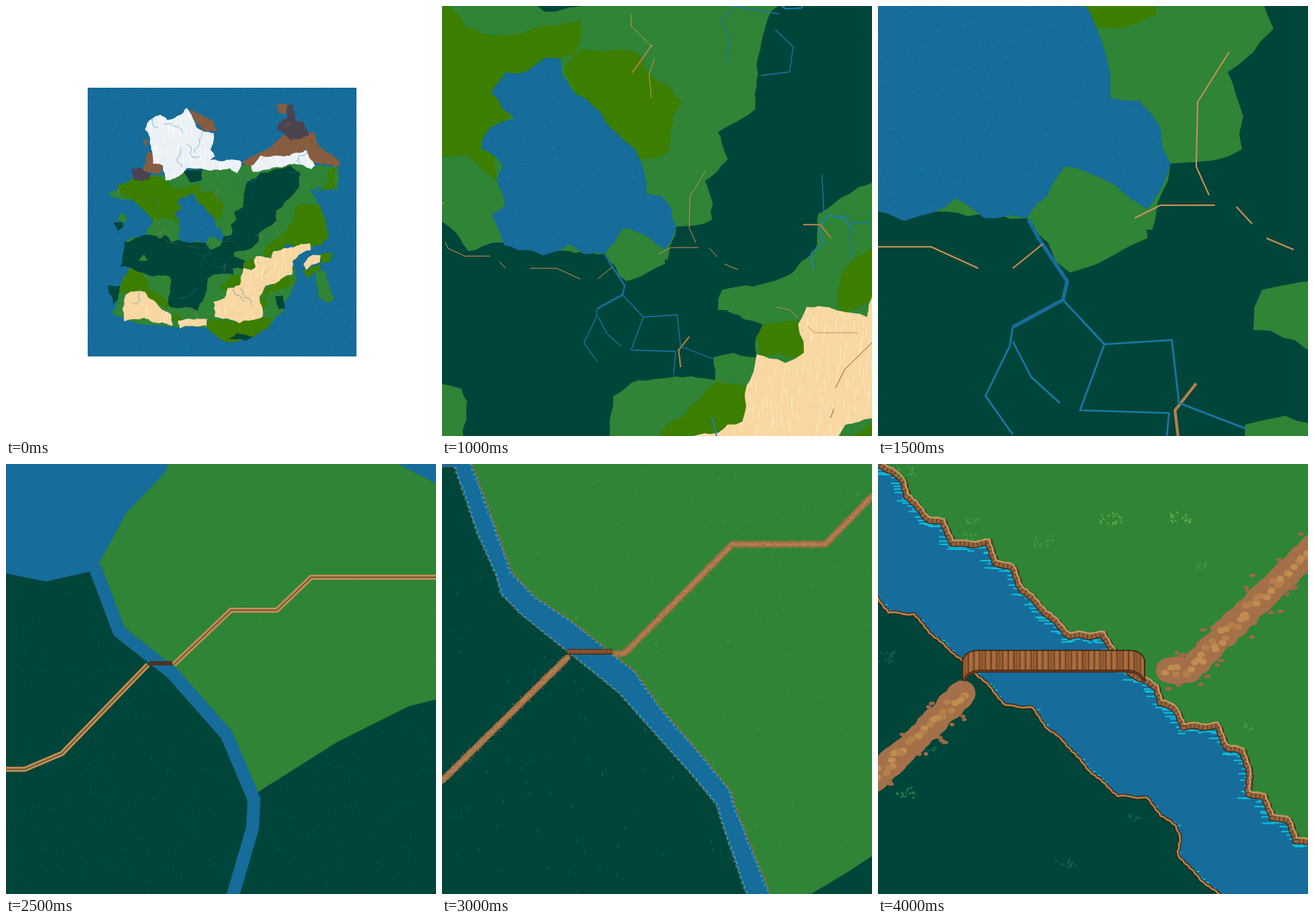
Recreate the animation shown at these times as an HTML page with a canvas. Size 600 by 600 pixels, loop 4500 ms.

```html
<!DOCTYPE html>
<html lang="en">
<head>
<meta charset="utf-8">
<title>Map zoom</title>
<style>
html, body { margin: 0; width: 100%; height: 100%; overflow: hidden; background: #fff; }
canvas { display: block; width: 600px; height: 600px; }
</style>
</head>
<body>
<canvas id="stage" width="600" height="600"></canvas>
<script>
const WATER = '#166c9a', GREEN = '#2f8436', GRASS = '#3b7e00', DARK = '#004539',
  ICE = '#ecf1f6', BROWN = '#875d3f', STONE = '#4b4350', SAND = '#f8d7a3',
  ROAD = '#c98f55', CYAN = '#0cc0dc';
const STEP = 500;
let g, px, seed, left, top0;

const rand = () => (seed = (seed * 16807) % 2147483647) / 2147483647;
const hash = (x, y) => { const v = Math.sin(x * 12.99 + y * 78.23) * 4375.85; return v - Math.floor(v) - .5; };
const pairs = s => s.trim().split(/\s+/).map(Number)
  .reduce((a, v, i, n) => i % 2 ? [...a, [n[i - 1], v]] : a, []);
const path = (s, end = 'z') => new Path2D('M' + s + end);
const join = a => a.flat().join(' ');

// Outline broken up by fixed midpoint shifts, like the edges of map cells
function rough(s) {
  const p = pairs(s), out = [];
  const split = (a, b) => {
    const len = Math.hypot(b[0] - a[0], b[1] - a[1]);
    if (len < 8) return out.push(a);
    const x = (a[0] + b[0]) / 2, y = (a[1] + b[1]) / 2;
    const d = Math.min(len, 50) * .22, m = [x + hash(x, y) * d, y + hash(y, x) * d];
    split(a, m);
    split(m, b);
  };
  p.forEach((a, i) => split(a, p[(i + 1) % p.length]));
  return path(join(out));
}
function fill(color, ...shapes) {
  g.fillStyle = color;
  shapes.forEach(s => g.fill(s));
}
function land(color, ...list) {
  const shapes = list.map(rough);
  fill(color, ...shapes);
  return shapes;
}
function line(color, width, ...list) {
  g.strokeStyle = color;
  g.lineWidth = width;
  list.forEach(s => g.stroke(path(s, '')));
}
// Random marks over the visible part, kept inside the shapes
function specks(color, n, w, h, shapes) {
  const all = new Path2D();
  shapes.forEach(s => all.addPath(s));
  g.save();
  g.clip(all);
  g.fillStyle = color;
  for (let i = 0; i < n; i++)
    g.fillRect(left + Math.floor(rand() * 600) * px, top0 + Math.floor(rand() * 600) * px,
      w * px, Math.ceil(h * (.5 + rand() / 2)) * px);
  g.restore();
}
// Points at even distances along a line, swung sideways in turn
function sample(s, step, amp = 0) {
  const p = pairs(s), out = [];
  for (let i = 1; i < p.length; i++) {
    const [ax, ay] = p[i - 1], [bx, by] = p[i];
    const n = Math.max(1, Math.round(Math.hypot(bx - ax, by - ay) / step));
    for (let j = 0; j < n; j++)
      out.push([ax + (bx - ax) * j / n + (out.length % 2 ? amp : -amp), ay + (by - ay) * j / n]);
  }
  return [...out, p[p.length - 1]];
}
function disc(color, x, y, rx, ry = rx) {
  g.fillStyle = color;
  g.beginPath();
  g.ellipse(x, y, rx, ry, 0, 0, 7);
  g.fill();
}
function dirt(s, w) {
  const p = sample(s, w / 7);
  for (const [x, y] of p) {
    const a = rand() * 7, r = w * (.5 + rand() * .28);
    disc('#9a6a48', x + Math.cos(a) * r, y + Math.sin(a) * r, w * (.07 + rand() * .05), w * .06);
  }
  for (const [x, y] of p) disc('#a47049', x, y, w * (.38 + rand() * .1));
  for (const [x, y] of p)
    disc(rand() < .5 ? '#c08c50' : '#b57f4b', x + (rand() - .5) * w * .3, y + (rand() - .5) * w * .3, w * .13, w * .1);
}
// Thin wandering line from a point
function wander(color, x, y, n, len) {
  let s = x + ' ' + y, a = hash(x, y) * 7;
  for (let i = 0; i < n; i++) {
    a += hash(x, a) * 2.4;
    s += ` ${x += Math.cos(a) * len} ${y += Math.sin(a) * len}`;
  }
  line(color, 1, s);
}

function overview() {
  const map = path('-72 -72h750v750h-750');
  fill(WATER, map);
  land(GREEN,
    `-16 222 44 195 100 172 250 155 385 142 505 139 626 150 626 212 597 208 548 212 582 272 592 300 598 350 500 415
     510 465 480 520 478 545 430 600 386 626 310 636 260 600 50 582 -4 560 18 480 45 430 20 428 30 360 90 342 110 298
     50 240 0 234`,
    '10 290 25 278 38 295 22 308', '565 440 592 440 616 515 605 528 570 510');
  land(GRASS,
    '10 203 50 182 130 178 160 203 240 198 236 222 200 250 180 300 182 311 160 292 110 298 50 240 20 222',
    '228 232 240 218 278 220 311 254 302 290 281 295 240 260',
    '510 257 578 258 592 300 598 350 580 368 505 372 422 402 422 375 485 325',
    '562 225 600 195 600 158 626 150 620 212');
  land(GRASS,
    '365 411 394 409 396 434 365 432', '40 437 75 437 100 490 128 505 155 525 150 545 18 495',
    '295 488 322 463 335 450 358 453 357 490', '408 530 425 490 480 453 512 465 430 505 414 566',
    '260 600 270 572 350 582 440 570 430 600 386 626 310 636', '163 575 172 555 190 585',
    '575 394 614 390 605 412 580 418', '525 440 578 420 578 435 540 460');
  land(DARK,
    `410 165 495 145 522 168 518 205 455 270 455 300 428 319 406 333 403 360 367 382 339 386 300 390 307 342 332 337
     327 310 343 295 336 276 362 260 367 210 378 188`,
    `20 428 30 360 70 345 115 340 130 350 143 338 162 359 186 353 210 358 258 361 300 365 339 386 336 400 367 410
     363 433 333 433 334 449 281 449 263 460 258 500 235 550 155 537 157 455 95 450 45 430`);
  land(DARK, '190 160 246 155 246 185 215 192', '450 510 472 507 478 545 460 545',
    '-16 480 18 480 12 520 0 532', '0 305 25 303 27 315 12 328', '318 630 345 612 388 622 370 634');
  land(GREEN, '70 412 85 393 95 410', '238 545 250 527 264 545 252 560');
  land(WATER,
    `216 224 226 225 227 236 261 273 281 294 286 319 296 320 307 342 299 358 270 343 257 361 242 361 232 354 214 362
     187 355 178 334 187 328 182 308 186 300 171 288 177 273 194 267 178 249 188 234 197 235`,
    '470 378 490 362 505 374 490 388');
  land(GREEN, '270 343 299 358 299 368 272 380 257 361');
  const brown = land(BROWN, '204 -16 240 0 280 20 290 48 250 50', '80 75 98 72 92 97',
    '95 107 112 108 138 143 130 170 78 160',
    '358 135 440 92 475 60 560 52 585 100 632 138 624 150 500 130 390 150', '456 -24 490 -24 480 2 462 0');
  specks('#73492f', 900, 1, 1, brown);
  land(STONE, '50 155 75 150 105 170 95 185 60 187',
    '462 25 485 15 482 -20 500 -26 508 20 530 22 545 60 492 75 457 45');
  const ice = land(ICE,
    `95 25 130 3 150 18 204 -16 220 10 250 50 280 55 270 100 283 120 270 130 330 128 357 135 345 167 325 153 262 158
     205 152 195 165 145 187 138 145 110 140 105 95 88 45`,
    '385 145 410 118 520 110 540 102 562 145 552 155 505 140 390 163');
  specks('#fbfdff', 2400, 1, 16, ice);
  const sand = land(SAND,
    `398 398 440 405 445 385 548 362 550 382 500 410 498 450 425 480 408 510 415 568 350 585 283 568 280 525 310 515
     319 488 353 478 356 453 363 431 383 437 396 430 392 410`,
    '35 505 87 497 110 520 160 560 165 592 85 570 30 580 25 545',
    '180 578 262 573 260 592 186 600', '530 420 555 395 578 395 575 415 537 437');
  specks('#fde5b9', 2400, 1, 17, sand);
  // Dots only where water shows
  const shot = g.getImageData(0, 0, 600, 600).data;
  g.fillStyle = '#0d8fb5';
  for (let i = 0; i < 3600; i++) {
    const x = Math.floor(rand() * 600), y = Math.floor(rand() * 600), o = (y * 600 + x) * 4;
    if (shot[o] === 22 && shot[o + 1] === 108) g.fillRect(left + x * px, top0 + y * px, px, px);
  }
  pairs('125 40 140 30 190 95 225 110 240 120 345 170 235 490 365 525 385 535 55 530 430 345 535 90 515 125 90 240')
    .forEach(([x, y]) => wander('#1c7fb0', x, y, 6, 11));
  pairs('425 107 495 28 290 180 290 215 145 325 15 225 415 350 240 575 112 297 310 440')
    .forEach(([x, y]) => wander('#b5804a', x, y, 2, 12));

  // Middle part, drawn on a grid twice as fine
  g.translate(143.5, 188);
  g.scale(.5, .5);
  line(WATER, 2.6, '228 347 235 360 255 390 252 403 217 422');
  line('#1878a8', 1.3, '217 422 215 435 198 470 217 497', '217 432 230 457 250 475',
    '252 403 281 434 328 431 333 475 380 493', '281 434 264 480 326 482 323 515',
    '470 11 408 0 390 20 402 42 397 80', '465 33 490 57 485 92 445 97', '530 235 533 290',
    '557 287 575 303 600 302', '570 303 572 350');
  line(ROAD, 1, '264 12 264 28 293 57', '297 72 289 95 292 128', '368 230 346 265 345 310 354 330',
    '302 346 320 337 358 337', '373 338 384 350', '394 360 413 368', '5 330 8 338 32 349 67 349', '80 357 89 366',
    '123 366 160 366 193 381', '217 381 238 364', '467 420 485 424 497 435', '510 447 520 456 580 456');
  line('#8a623c', 1, '602 468 562 507 549 533', '547 562 542 575');
}

function crossing() {
  const all = path('0 0h600v600h-600');
  fill(DARK, all);
  specks('#0f5a4b', 450, 1, 2, [all]);
  fill(WATER, path('0 0 540 0 566 35 582 76 564 115 555 152 522 180 514 217 183 227 178 231 147 238 82 225 47 237 0 182'));
  const meadow = ['540 0 600 0 600 76 582 76 566 35',
    '272 88 400 160 514 217 513 250 519 271 468 308 400 325 350 350 293 386 275 345 237 302 202 275 183 227 203 190 230 162 246 118'
  ].map(s => path(s));
  fill(GREEN, ...meadow);
  specks('#469744', 500, 1, 1, meadow);
  line(WATER, 9, '181 228 198 273 235 302 273 345 292 390 291 410 277 458');
  line(WATER, 6.5, '277 459 235 473 205 490 165 518 134 533 135 560 131 578 136 584');
  line(WATER, 4, '136 584 122 602', '136 584 158 602', '277 460 305 480 332 515 370 545 396 577 386 602',
    '396 577 440 572 485 577 525 565 572 568 588 585 593 602');
  const roads = ['0 349 45 369 132 369 158 358 218 296',
    '236 296 276 258 308 258 332 235 460 235 475 219 515 219 546 187 600 187'];
  line(ROAD, 3.6, ...roads);
  line('#6f5a36', 1, ...roads);
  line('#4d3323', 3, '219 295 235 295');
}

function ford() {
  const west = sample('17 4 50 100 75 155 82 182 110 210 175 262 247 320 282 360 345 430 382 475 395 515 424 600', 4, 1);
  const east = sample('42 0 98 152 130 185 182 220 270 290 305 340 370 415 402 455 412 485 458 600', 4, 1.2);
  const all = path('0 0h600v600h-600');
  const dark = [path('0 0 ' + join(west) + ' 0 600'), path('600 547 565 570 515 600 600 600')];
  fill(GREEN, all);
  specks('#479a42', 150, 1, 4, [all]);
  fill(DARK, ...dark);
  specks('#17604f', 190, 1, 5, dark);
  fill(WATER, path('0 0h42l-25 4h-17'), path(join([...west, ...east.slice().reverse()])));
  const shift = (a, d) => join(a.map(([x, y]) => [x + d, y]));
  g.setLineDash([4, 4]);
  line(CYAN, 1.3, shift(east, -2.5), shift(west, 1.8));
  g.setLineDash([5, 2]);
  line('#9b673f', 2, join(east));
  line('#8a6242', 1.2, join(west), '0 4 17 4');
  g.setLineDash([]);
  dirt('0 442 175 270', 10);
  dirt('243 265 255 264 405 112 535 112 600 45', 10);
  g.fillStyle = '#4b2c1a';
  g.fillRect(175, 258, 63, 8);
  for (let x = 176; x < 237; x += 2) {
    g.fillStyle = x % 4 ? '#8a5530' : '#a0673b';
    g.fillRect(x, 259, 1.5, 5.5);
  }
}

function tuft(color, size, places) {
  g.strokeStyle = color;
  g.lineWidth = 1.5;
  g.beginPath();
  for (const [x, y] of pairs(places))
    for (let i = 0; i < size; i++) {
      const dx = (rand() - .5) * size * 1.6, dy = (rand() - .5) * size;
      g.moveTo(x + dx, y + dy);
      g.lineTo(x + dx + Math.sign(dx) * 3, y + dy - 3);
    }
  g.stroke();
}

function bridge() {
  const ripple = (a, h) => a.map(([x, y]) => [x, y + Math.sin(x / 5.1) * h]);
  const east = ripple(sample(`4 -4 36 18 42 40 70 72 92 78 105 105 120 108 155 106 165 133 190 142 200 168 232 200 268 235
    315 235 350 285 390 308 396 328 418 340 428 362 475 362 487 390 510 398 520 425 518 455 540 462 552 488 575 495
    585 520 604 525`, 6, .8), 1.5);
  const west = ripple(sample(`-4 183 15 207 50 210 75 238 118 275 155 310 178 337 215 340 237 370 257 385 295 428 335 463
    375 466 395 490 415 505 422 520 418 545 450 580 478 602`, 5, .8), 1);
  const river = path('-4 -4 ' + join(east) + ' 604 604 ' + join(west.slice().reverse()));
  fill(GREEN, path('0 0h600v600h-600'));
  fill(DARK, path('-4 604 ' + join(west)));
  fill(WATER, river);
  g.save();
  g.clip(river);
  g.fillStyle = CYAN;
  for (const [x, y] of east) {
    const w = 6 + rand() * 14;
    g.fillRect(x - w + 2, y + 7 + rand() * 5, w, 2);
  }
  for (const [x, y] of west) if (rand() < .6) g.fillRect(x, y + rand() * 4 - 2, 3 + rand() * 6, 1.5);
  g.restore();
  g.save();
  g.translate(-1, 4);
  line('#38230f', 10, join(east));
  line('#96633c', 7.5, join(east));
  g.setLineDash([1.5, 4.5]);
  line('#65402a', 7.5, join(east));
  g.restore();
  line('#c39a63', 2.4, join(east));
  line('#38230f', 5, join(west));
  line('#b5824f', 2.6, join(west));
  dirt('118 320 50 388 -10 442', 42);
  dirt('405 288 435 288 480 240 610 115', 42);

  const deck = path('118 303V274Q121 261 140 260H351Q369 261 372 274V303Q367 291 350 290H140Q123 291 118 303');
  fill('#9b6337', deck);
  g.save();
  g.clip(deck);
  for (let x = 118, i = 0; x < 374; x += 8, i++) {
    g.fillStyle = i % 3 ? '#a96f3f' : '#8c552e';
    g.fillRect(x + 2, 260, 3, 44);
    g.fillStyle = i % 4 ? '#6c4022' : '#71301b';
    g.fillRect(x + 7, 260, 1.5, 44);
  }
  g.restore();
  const rail = '120 303Q124 290 142 289H349Q366 290 371 303';
  line('#3c2010', 1.6, '118 303V274Q121 261 140 260H351Q369 261 372 274V303');
  line('#4a2814', 4, rail);
  line('#7d482a', 1.2, rail);

  tuft('#62ae45', 17, '325 77 422 77');
  tuft('#469a40', 16, '230 110 40 12');
  tuft('#469a40', 9, '132 80 452 143 516 368 128 103');
  tuft('#0d6653', 16, '8 272 262 558');
  tuft('#0d6653', 9, '356 495 72 400');
  tuft('#2f8051', 16, '37 461');
}

function render([draw, k, x, y]) {
  const c = document.createElement('canvas');
  c.width = c.height = 600;
  g = c.getContext('2d');
  g.fillStyle = '#fff';
  g.fillRect(0, 0, 600, 600);
  g.setTransform(k, 0, 0, k, x, y);
  g.lineJoin = 'round';
  px = 1 / k;
  left = -x * px;
  top0 = -y * px;
  seed = 4711;
  draw();
  return c;
}

const views = [
  [overview, .5, 150, 150], [overview, 1, 0, 0],
  [overview, 2, -287, -376], [overview, 4, -820, -1148],
  [crossing, 1, 0, 0], [crossing, 2, -238, -312],
  [ford, 1, 0, 0], [ford, 2, -188, -256],
  [bridge, 1, 0, 0]
].map(render);

const stage = document.getElementById('stage').getContext('2d');
function tick() {
  const i = Math.floor(performance.now() / STEP) % views.length;
  stage.drawImage(views[i], 0, 0);
  requestAnimationFrame(tick);
}
tick();
</script>
</body>
</html>
```
